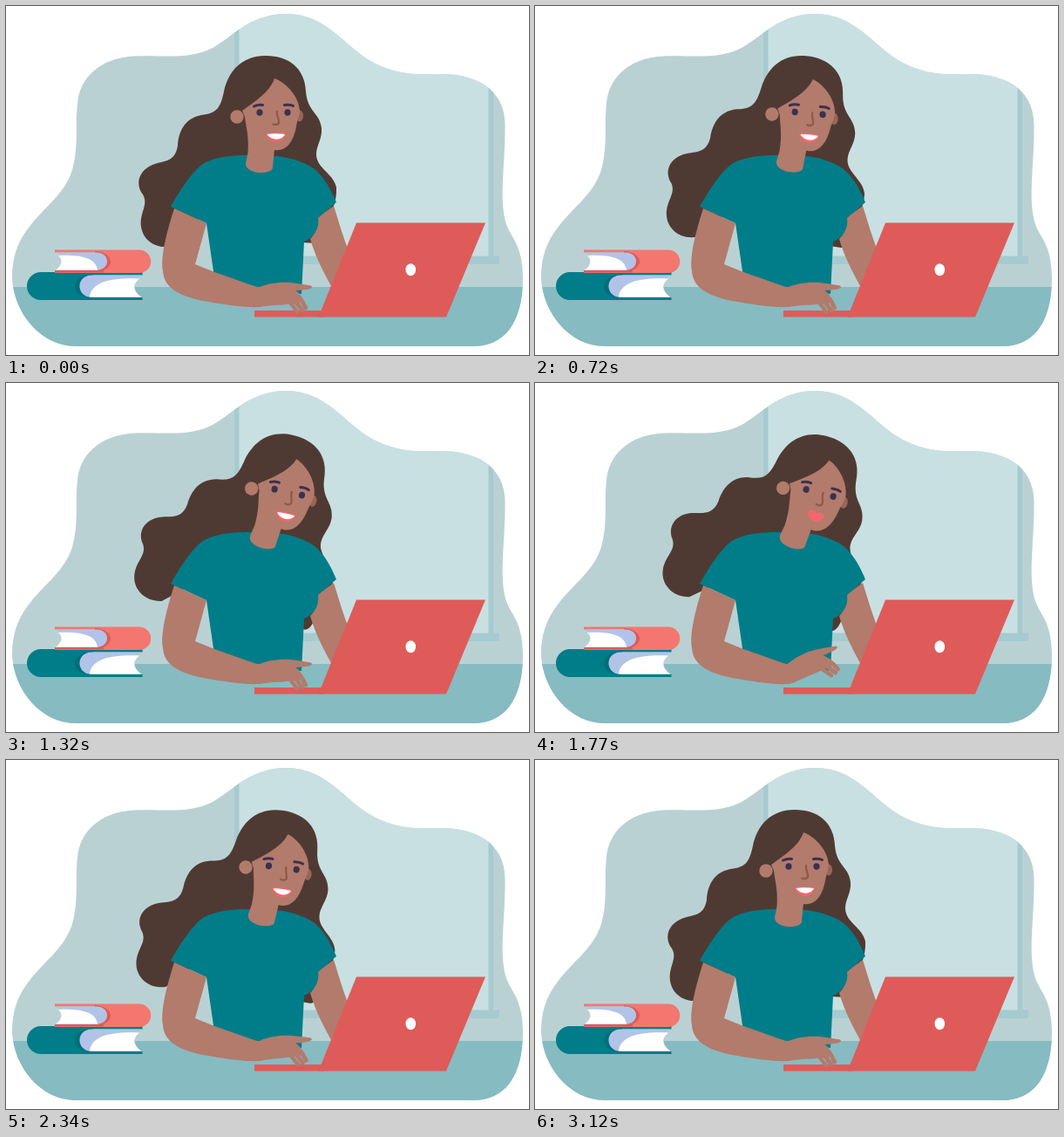
Write an HTML page with a canvas that moves like this. It is 600 px wide and 400 px high and loops after 3150 ms.

```html
<!DOCTYPE html>
<html lang="en">
<head>
<meta charset="utf-8">
<title>Working at a laptop</title>
<style>
html, body { margin: 0; width: 100%; height: 100%; overflow: hidden; background: #fff; }
canvas { display: block; width: 600px; height: 400px; }
</style>
</head>
<body>
<canvas id="stage"></canvas>
<script>
const LOOP = 3150, STEP = 30;
const canvas = document.getElementById('stage');
const ctx = canvas.getContext('2d');
const dpr = window.devicePixelRatio || 1;
canvas.width = 600 * dpr;
canvas.height = 400 * dpr;

const C = {
  wall: '#bad1d4', pane: '#c9e0e2', frame: '#a5cbd0', table: '#86bbc1',
  hair: '#4f3a33', skin: '#b27b6c', shade: '#8f5a4d', shirt: '#007d88',
  ink: '#3b3150', lips: '#f0686e', red: '#de5b59', coral: '#f4766f',
  lilac: '#b1c4e8', deep: '#00707c', white: '#fff'
};

const P = {
  blob: 'M7 312C7 290 12 272 26 254C46 228 67 216 76 188C84 160 79 135 82 112C84 84 106 60 146 57.5C182 56 210 62 237 48C262 34 280 9 322 9C368 9 390 48 420 64C452 81 476 78 496 78C537 77 572 94 572.5 135C573 180 566 215 572.5 245C577 265 593 270 593 312C593 365 570 390 537 390L80 390C40 390 9 352 7 312Z',
  hair: 'M298 57C270 57 255 75 250 98C246 117 242 123 224 125C204 129 198 145 197 160C194 180 180 177 168 182C152 189 148 204 157 216C164 228 153 236 155 253C157 268 172 280 192 275L212 258L226 238L338 271L358 272C366 272 369 258 367 250C372 240 380 225 379 208C376 192 356 186 356 170C356 160 363 152 362 140C360 122 346 122 344 98C343 72 325 57 298 57Z',
  farArm: 'M358 242L376 229C382 248 386 262 392 278L373 321C366 308 355 288 349 267C354 262 358 254 358 242Z',
  shirt: 'M189 230C200 210 212 193 222 184C234 174 256 171 276 171L310 172C325 173 345 180 354 187C366 197 373 211 379 225L358 243C360 256 352 266 342 270L341 290L339 330L240 318L230 249Z',
  face: 'M308 83C304 95 293 105 271 120L274 127C275 138 279 148 277.5 168L275 180C274 194 308 194 306 184L308 165C322 167 330 155 333 138C334 132 336 128 337 120C336 104 322 88 308 83Z',
  nearArm: 'M193 232C184 260 177 288 180 304C181 321 196 332 226 338C250 342 272 346 292 345L305 338L296 322L288 322C265 314 235 304 217 296L230 249Z',
  palm: 'M288 323C300 318 312 316 325 317.5L338 334L337 342L328 341C322 342 314 343 306 343L288 345Z',
  finger: 'M312 317C325 316 338 318.5 350 320.5Q353 323 347 324.5Q338 326 326 326Z',
  lid: 'M402 248.5H550L505 356.5H358.5Z'
};

const fill = (d, color) => {
  ctx.fillStyle = color;
  ctx.fill(new Path2D(d));
};
const line = (d, color, width) => {
  ctx.strokeStyle = color;
  ctx.lineWidth = width;
  ctx.stroke(new Path2D(d));
};
const rect = (x, y, w, h, color) => {
  ctx.fillStyle = color;
  ctx.fillRect(x, y, w, h);
};
const oval = (x, y, rx, ry, color) => {
  ctx.fillStyle = color;
  ctx.beginPath();
  ctx.ellipse(x, y, rx, ry, 0, 0, Math.PI * 2);
  ctx.fill();
};
const turned = (x, y, deg, draw) => {
  ctx.save();
  ctx.translate(x, y);
  ctx.rotate(deg * Math.PI / 180);
  ctx.translate(-x, -y);
  draw();
  ctx.restore();
};

const clamp = v => Math.max(0, Math.min(1, v));
const ease = v => (1 - Math.cos(Math.PI * clamp(v))) / 2;

const headTilt = t => 14.5 * (t < 1760 ? ease(t / 1760) : 1 - ease((t - 1760) / 1190));
const mouthShut = t => clamp((t - 1590) / 90) * clamp((1980 - t) / 90);
// quick typing taps: down on even steps, lifted on odd ones
const handLift = t => [0, 1, 0.1, 1][Math.round(t / STEP) % 4] * -18.7;

function room() {
  fill(P.blob, C.wall);
  ctx.save();
  ctx.clip(new Path2D(P.blob));
  rect(267, 0, 287, 287, C.pane);
  rect(262, 0, 5.5, 290, C.frame);
  rect(553.5, 0, 5.5, 290, C.frame);
  rect(255, 286.5, 311, 9.5, C.frame);
  rect(0, 322, 600, 78, C.table);
  ctx.restore();
}

function books() {
  fill('M156.5 305H40A16 16 0 0 0 40 337H156.5V334H96V308.5H156.5Z', C.shirt);
  fill('M100 307C72 309 72 334 100 335Z', C.deep);
  fill('M156 308.5H98C80 309 80 333 98 334H156C145 326 145 316 156 308.5Z', C.lilac);
  fill('M153 312.5C118 311 98 317 96 333.5H155C145 326 145 319 153 312.5Z', C.white);

  fill('M56 279.5H153A13.2 13.2 0 0 1 153 306H56V303H108V282.5H56Z', C.coral);
  fill('M102 281C126 283 126 303 102 305Z', C.red);
  fill('M56 303H112V305.5H56Z', C.red);
  fill('M57 282.5H104C120 283 120 302 104 303H57C66 297 66 289 57 282.5Z', C.lilac);
  fill('M60 286C84 285 103 288 105 302.5H57C65 297 65 290 60 286Z', C.white);
}

function mouth(shut) {
  if (shut < 1) {
    ctx.save();
    ctx.translate(309.5, 147 + shut * 2);
    ctx.scale(1 - shut * 0.15, 1 - shut * 0.5);
    fill('M-12 -1C-7 -2.5 7 -2.5 12 -1C9 12 -7 12 -12 -1Z', C.lips);
    fill('M-10 0C-4 -1 4 -1 10.5 0C7 7.5 -5 7.5 -10 0Z', C.white);
    ctx.restore();
  }
  if (shut > 0) {
    ctx.globalAlpha = shut;
    fill('M299 147C302 142 307 143 309 146C313 142 317 144 319 147C318 157 303 158 299 147Z', C.lips);
    ctx.globalAlpha = 1;
  }
}

function head(shut) {
  oval(337, 126, 4, 6.5, '#9a6558');
  fill(P.face, C.skin);
  oval(265, 127, 7.7, 7.7, C.skin);
  oval(291, 122, 3.6, 3.8, C.ink);
  oval(323, 122, 3.6, 3.8, C.ink);
  line('M284.5 115Q289 112.8 294.5 113.5', C.ink, 3);
  line('M319.5 113.5Q325 112.5 329.5 114.5', C.ink, 3);
  line('M311 121C310 126 314 131 313 134C311 137 308 136 306.5 135.5', C.shade, 2.3);
  mouth(shut);
}

function hand() {
  fill(P.palm, C.skin);
  fill(P.finger, C.skin);
  line('M326 324Q338 332 343.5 346', C.skin, 5);
  line('M324 329Q333 338 339.5 349', C.skin, 5);
  line('M320 333Q329 343 334 350.5', C.skin, 4.5);
}

function draw(t) {
  const tilt = headTilt(t);
  ctx.setTransform(dpr, 0, 0, dpr, 0, 0);
  ctx.lineCap = ctx.lineJoin = 'round';
  rect(0, 0, 600, 400, C.white);
  room();
  books();
  turned(301, 201, tilt, () => fill(P.hair, C.hair));
  fill(P.farArm, C.skin);
  fill(P.shirt, C.shirt);
  turned(301, 201, tilt, () => head(mouthShut(t)));
  rect(285, 349, 80, 7.5, C.red);
  fill(P.nearArm, C.skin);
  turned(290, 325, handLift(t), hand);
  fill(P.lid, C.red);
  oval(464.3, 302.3, 5.8, 7, C.white);
}

const start = performance.now();
function tick() {
  const t = (performance.now() - start) % LOOP;
  draw(Math.floor(t / STEP) * STEP);
  requestAnimationFrame(tick);
}
tick();
</script>
</body>
</html>
```
